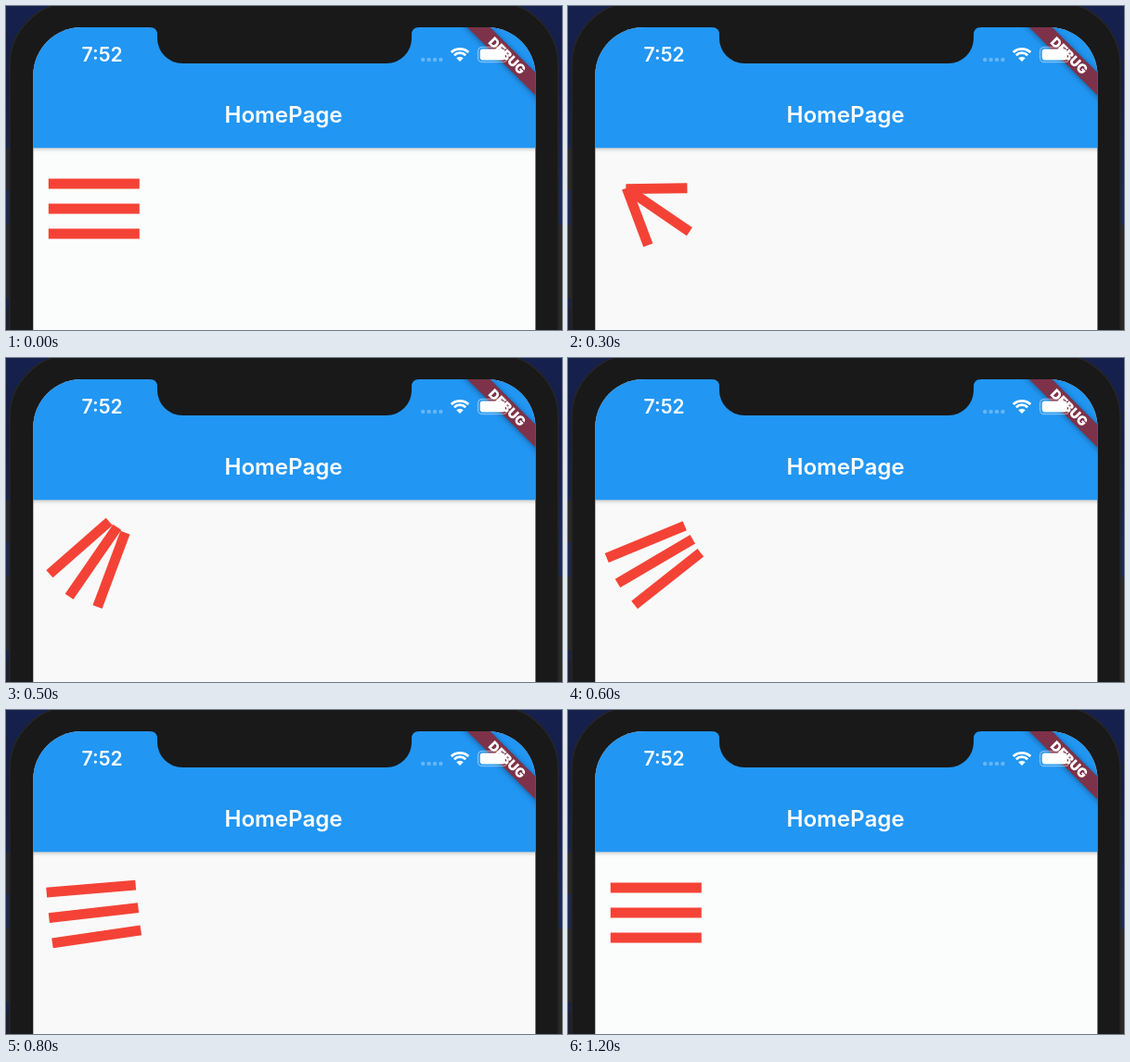
These frames come from a looping animation (599x350 px, 1300 ms). An HTML page with a canvas:

```html
<!DOCTYPE html>
<html lang="en">
<head>
<meta charset="utf-8">
<title>HomePage</title>
<style>
  html, body { margin: 0; width: 100%; height: 100%; overflow: hidden; background: #1a1a1a; }
  canvas { display: block; }
</style>
</head>
<body>
<canvas id="stage" width="599" height="350"></canvas>
<script>
const W = 599, H = 350, LOOP = 1300, STEP = 100;
const START = 84, DURATION = 940;
const FONT = 'Inter, Roboto, sans-serif';
const BEZEL = '#191919';
const ctx = document.getElementById('stage').getContext('2d');

function rect(x, y, w, h, color, r = 0) {
  ctx.fillStyle = color;
  ctx.beginPath();
  ctx.roundRect(x, y, w, h, r);
  ctx.fill();
}

function line(x1, y1, x2, y2, width) {
  ctx.lineWidth = width;
  ctx.beginPath();
  ctx.moveTo(x1, y1);
  ctx.lineTo(x2, y2);
  ctx.stroke();
}

function text(str, x, y, font, align) {
  ctx.font = font + ' ' + FONT;
  ctx.textAlign = align;
  ctx.fillStyle = '#fff';
  ctx.fillText(str, x, y);
}

// Cubic bezier (0.4, 0, 0.2, 1)
function ease(x) {
  if (x <= 0) return 0;
  if (x >= 1) return 1;
  let lo = 0, hi = 1;
  for (let i = 0; i < 30; i++) {
    const s = (lo + hi) / 2, q = 1 - s;
    if (1.2 * q * q * s + 0.6 * q * s * s + s * s * s < x) lo = s;
    else hi = s;
  }
  return lo * lo * (3 - 2 * lo);
}

function drawPhone() {
  const sky = ctx.createLinearGradient(0, 0, 0, H);
  sky.addColorStop(0, '#16214e');
  sky.addColorStop(0.25, '#141d46');
  sky.addColorStop(0.6, '#1c2955');
  sky.addColorStop(1, '#172147');
  ctx.fillStyle = sky;
  ctx.fillRect(0, 0, W, H);
  rect(-4, 154, 10, 45, '#292929', 2);
  rect(-4, 236, 10, 80, '#292929', 2);
  rect(-4, 326, 10, 30, '#1c2030', 2);
  rect(593, 236, 10, 120, '#292929', 2);
  rect(4, -4, 591, 420, BEZEL, 68);
  ctx.strokeStyle = '#262626';
  ctx.lineWidth = 1.5;
  ctx.stroke();
}

function drawNotch() {
  ctx.fillStyle = BEZEL;
  ctx.beginPath();
  ctx.moveTo(155, 22);
  ctx.lineTo(155, 23);
  ctx.quadraticCurveTo(163, 23, 163, 31);
  ctx.arcTo(163, 62, 190, 62, 27);
  ctx.arcTo(437, 62, 437, 31, 27);
  ctx.lineTo(437, 31);
  ctx.quadraticCurveTo(437, 23, 445, 23);
  ctx.lineTo(445, 22);
  ctx.fill();
}

function drawBanner() {
  ctx.save();
  ctx.translate(540, 53.7);
  ctx.rotate(Math.PI / 4);
  ctx.shadowColor = 'rgba(0,0,0,.4)';
  ctx.shadowBlur = 6;
  rect(-80, -8.7, 160, 17.4, '#7d3249');
  ctx.shadowColor = 'transparent';
  text('DEBUG', 0, 5.2, '900 14.3px', 'center');
  ctx.restore();
}

function drawStatus() {
  text('7:52', 81.6, 60, '600 21px', 'left');

  ctx.fillStyle = 'rgba(255,255,255,.3)';
  for (let i = 0; i < 4; i++) {
    ctx.beginPath();
    ctx.arc(449.2 + i * 6.4, 58, 2.2, 0, 7);
    ctx.fill();
  }

  ctx.save();
  ctx.strokeStyle = ctx.fillStyle = '#fff';
  ctx.lineWidth = 2.8;
  const mid = -Math.PI / 2, spread = 0.78;
  for (const r of [13.2, 8.8]) {
    ctx.beginPath();
    ctx.arc(489, 59.5, r, mid - spread, mid + spread);
    ctx.stroke();
  }
  ctx.beginPath();
  ctx.moveTo(489, 60);
  ctx.arc(489, 60, 5.3, mid - spread, mid + spread);
  ctx.fill();
  ctx.restore();

  ctx.strokeStyle = 'rgba(255,255,255,.4)';
  ctx.lineWidth = 1.3;
  ctx.beginPath();
  ctx.roundRect(508.5, 44.5, 31.5, 16, 4.5);
  ctx.stroke();
  rect(510.7, 46.6, 27, 11.8, '#fff', 2.8);
  rect(541.5, 50, 2, 5, 'rgba(255,255,255,.45)', 1);
}

// Arrow pointing left at v = 0, three level bars at v = 1
function drawIcon(v) {
  const u = 1 - v;
  const tipX = -49 + 12 * u ** 0.75, tipY = 28.2 * v ** 2.4 - 1.2;
  const tailX = 49 - 44 * u ** 1.25, tailY = 27 + 15 * u - 2.7 * u * u;
  ctx.save();
  ctx.translate(94.8, 219);
  ctx.rotate(Math.PI * v);
  ctx.strokeStyle = '#f44336';
  line(tipX, 0, 49 - 6.5 * u, 0, 10.8);
  for (const side of [-1, 1]) line(tipX, side * tipY, tailX, side * tailY, 10.8);
  ctx.restore();
}

function drawScreen(t) {
  const moving = t >= STEP && t < 1000;
  ctx.save();
  ctx.beginPath();
  ctx.roundRect(29.3, 23, 541.1, 400, 52);
  ctx.clip();
  rect(29, 23, 542, 340, moving ? '#f9f9f9' : '#fbfdfd');
  ctx.shadowColor = 'rgba(0,0,0,.35)';
  ctx.shadowBlur = 5;
  ctx.shadowOffsetY = 1;
  rect(20, 23, 560, 130.3, '#2196f3');
  ctx.shadowColor = 'transparent';
  text('HomePage', 299, 126, '600 24.1px', 'center');
  drawBanner();
  drawStatus();
  drawIcon(t < STEP ? 1 : ease((t - START) / DURATION));
  ctx.restore();
  drawNotch();
}

let origin = null;
function frame(now) {
  if (origin === null) origin = now;
  const t = Math.floor(((now - origin) % LOOP) / STEP) * STEP;
  drawPhone();
  drawScreen(t);
  requestAnimationFrame(frame);
}
requestAnimationFrame(frame);
</script>
</body>
</html>
```
